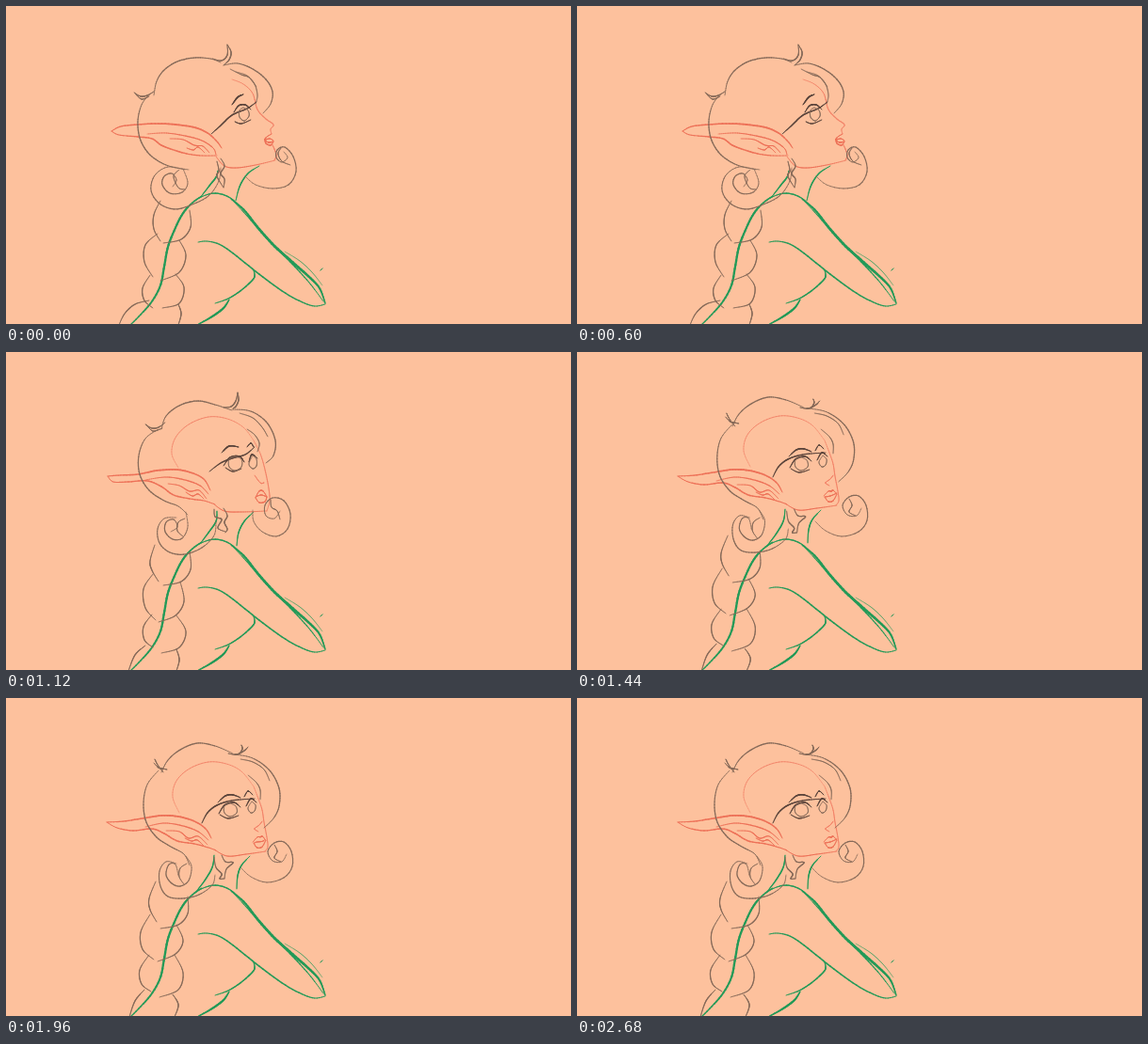
Animation, 600 px wide and 338 px high, one loop 2.72 s. Source, as an HTML page with a canvas:

```html
<!DOCTYPE html>
<html>
<head>
<meta charset="utf-8">
<style>
html, body { margin: 0; width: 100%; height: 100%; overflow: hidden; background: #fdc19d; }
canvas { display: block; }
</style>
</head>
<body>
<canvas id="stage" width="600" height="338"></canvas>
<script>
const ctx = document.getElementById('stage').getContext('2d');
const LOOP = 2720, STEP = 40, SAMPLES = 44;
const BROWN = '#866a59', DARK = '#5b453c', RED = '#ed7158', PINK = '#f28369', GREEN = '#239a58';
const strokes = [];

const mix = (a, b, k) => a + (b - a) * k;
const ease = k => k * k * (3 - 2 * k);

// Resample a smooth curve through "x,y x,y ..." so that poses can be blended.
function curve(text) {
  if (!text) return null;
  const p = text.split(' ').map(pair => pair.split(',').map(Number));
  const at = i => p[Math.max(0, Math.min(p.length - 1, i))];
  return Array.from({ length: SAMPLES + 1 }, (_, n) => {
    const u = n / SAMPLES * (p.length - 1), i = Math.min(Math.floor(u), p.length - 2), f = u - i;
    return [0, 1].map(c => {
      const a = at(i - 1)[c], b = at(i)[c], d = at(i + 1)[c], e = at(i + 2)[c];
      return b + f / 2 * (d - a + f * (2 * a - 5 * b + 4 * d - e + f * (3 * (b - d) + e - a)));
    });
  });
}

// Poses: profile, turning, three-quarter view, and an optional open mouth.
function add(color, width, sway, ...poses) {
  strokes.push({ color, width, sway, poses: poses.map(curve) });
}
const still = (width, pts) => add(GREEN, width, 0, pts, pts, pts);

// Body
still(2.3, '208,202 198,209 187,222 179,238 172,256 168,277 164,297 155,314 143,328 132,339');
still(.8, '203,206 192,214 184,226 177,242');
still(1.3, '202,206 212,201 222,199 232,201 241,206 250,215');
still(2.8, '239,205 253,217 268,236 285,255 305,273 322,288 333,300 339,316');
still(1.4, '241,207 256,223 275,245 300,270 322,294 337,314');
still(.6, '296,261 312,271 325,283 336,297');
still(1.6, '204,251 213,250 226,253 240,262 260,278 278,292 298,306 315,315 328,319 339,317');
still(1.5, '263,281 264,286 262,291 250,302 236,311 222,316');
still(2.1, '237,312 231,321 219,330 203,339');
still(.6, '334,281 336,279');
add(GREEN, 1.5, 0, '225,175 223,182 216,191 206,204', '224,169 223,180 215,192 206,204', '221,167 219,180 211,194 201,207');
add(GREEN, 1.4, 0, '269,170 258,177 251,186 247,195 244,207', '263,170 253,180 247,192 245,206', '259,168 250,178 246,189 245,203');

// Braid
add(BROWN, 1.2, .3, '164,207 157,222 157,237 164,250', '158,205 153,222 155,232 162,244', '159,195 152,213 153,225 160,238');
add(BROWN, 1.2, .3, '161,242 148,254 147,272 156,288', '156,236 146,252 148,272 159,285', '153,230 143,249 145,267 157,278');
add(BROWN, 1.2, .3, '153,286 145,300 147,313 156,321', '155,279 146,292 147,306 156,314', '152,273 142,289 144,304 154,312');
add(BROWN, 1.2, .3, '152,313 137,317 126,327 120,339', '148,312 137,322 130,339', '147,310 137,322 131,339');
add(BROWN, 1.2, .3, '195,217 196,235 186,248 167,252', '195,212 196,231 186,244 167,248', '193,211 193,229 183,241 164,245');
add(BROWN, 1.2, .3, '184,249 191,265 184,283 164,292', '185,244 189,265 180,280 162,287', '181,241 188,258 180,272 161,280');
add(BROWN, 1.2, .3, '180,285 189,299 184,316 166,321', '181,280 191,297 184,314 165,320', '179,273 188,292 183,310 163,318');
add(BROWN, 1.2, .3, '183,317 186,327 183,339', '181,316 184,327 181,339', '177,315 183,326 179,339');

// Skull, profile and jaw
add(PINK, .9, 0, null, '183,123 176,108 180,91 194,77 215,69 235,71 252,80 263,94', '184,122 177,105 181,88 195,75 215,68 234,70 250,78 263,94');
add(PINK, 1.1, 0, '240,78 252,83 262,93 267,110 276,120 284,126 281,131 282,136', '263,94 270,108 275,125 279,145 280,158 277,169', '263,94 268,107 272,119 274,132 277,148 278,158 275,163');
add(RED, 1, 0, '223,160 232,170 245,172 265,169 286,164', '220,161 232,169 250,170 277,169', '221,161 235,168 255,166 276,163');
add(PINK, 1, 0, '282,146 285,152 287,159 285,164', '264,131 270,139 274,139', '272,131 269,135 264,139 268,142');
add(RED, 1.1, 0, '282,136 277,139 275,142 280,141 284,143', '265,155 268,149 271,147 274,149 277,154', '262,153 267,148 270,148 272,147 276,151', '263,154 266,148 271,146 275,148 275,154');
add(RED, 1.1, 0, '275,142 276,146 281,148 284,144', '265,155 269,160 275,159 277,154', '263,154 267,159 272,158 276,151', '263,154 264,159 271,160 275,153');
add(RED, .9, 0, '275,143 279,145 284,144', '265,154 271,152 277,154', '263,154 269,153 276,150', '265,156 269,150 274,151 273,156 265,156');

// Ear
add(RED, 1.8, 0, '112,133 122,128 140,126 160,125 180,126 200,129 214,135 224,144 229,151', '108,132 120,131 140,130 160,126 180,125 196,128 210,135 217,147', '107,132 125,131 145,128 165,125 183,126 200,131 212,139 218,149');
add(RED, 1.5, 0, '112,133 120,137 140,139 155,141 165,148 178,153 192,157 207,159 224,159', '108,132 114,138 130,138 150,137 165,143 178,152 195,156 210,158 222,162', '107,132 118,138 135,141 155,139 168,144 182,152 200,155 215,159 223,162');
add(RED, 1.2, 0, '150,136 170,135 190,138 208,143 220,151 223,158', '148,136 170,133 190,136 206,142 215,151', '148,137 168,133 188,136 204,142 215,151');
add(RED, 1.1, 0, '174,141 188,142 200,148 209,149 216,156', '172,140 184,142 195,148 205,147 213,156', '170,141 184,142 194,149 204,147 214,156');
add(RED, 1, 0, '192,151 199,153 204,150 211,156', '191,149 198,153 204,151 210,156', '190,149 197,152 203,151 210,157');

// Hair on the head
add(BROWN, 1.3, 0, '157,95 160,80 168,68 182,59 200,55 217,56 228,60', '165,82 170,68 184,57 203,52 222,56 240,62', '165,79 172,66 185,55 203,48 222,51 241,59');
add(BROWN, 1.2, .2, '136,92 143,96 150,95 157,91', '148,77 155,81 162,80 169,75', '157,69 162,74 166,75 171,76');
add(BROWN, 1, .2, '137,93 144,99 152,96', '149,77 156,84 166,81', '158,65 161,71 167,79');
add(BROWN, 1.3, .2, '219,56 229,58 235,52 235,41', '231,59 239,58 244,52 246,43', '236,59 245,60 253,56 257,52');
add(BROWN, 1.3, .2, '235,41 239,49 237,57 231,63', '246,43 247,51 244,58 241,60', '250,50 251,54 248,59 243,60');
add(BROWN, 1.3, .9, '231,63 246,61 262,67 276,78 283,91 281,104 273,114', '240,61 260,63 277,75 286,94 284,110 276,118', '243,60 262,64 280,77 290,96 290,115 284,128 274,138');
add(BROWN, 1, .8, '238,67 250,73 258,76 266,86', '248,65 262,70 272,80 278,90', '249,65 262,68 274,76 280,88');
add(BROWN, .9, .5, '244,70 256,74 264,83 267,95 265,104', '256,82 264,88 269,97 267,106', '257,82 266,90 270,98 270,108');
add(DARK, 1.5, 0, '218,136 228,127 240,116 256,109 266,102', '216,127 228,118 240,113 254,109 264,101', '208,133 214,122 224,114 240,109 264,107');
add(BROWN, 1.3, .7, '152,94 144,105 140,122 142,140 150,155 162,165 176,171 194,174', '162,82 148,92 141,110 142,130 152,147 168,158 183,164 193,173', '162,77 150,92 146,112 149,132 160,148 175,158 189,166 195,178');

// Curls and side lock
add(BROWN, 1.2, .6, '190,174 172,171 158,180 154,196 163,210 180,216 200,210 216,201 226,186 228,172', '181,176 168,177 161,188 163,203 174,213 190,215 208,208 221,195 223,180', '181,176 170,174 163,184 164,200 172,211 188,213 205,209 219,199 222,188');
add(BROWN, 1.2, .6, '188,173 193,188 187,198 174,199 166,190 168,181 176,178 181,185 177,192', '191,170 193,186 187,198 177,199 169,191 170,181 178,178 182,186 175,191', '191,168 197,179 194,194 185,200 176,197 170,188 173,177 180,177 183,189');
add(BROWN, .9, .6, '184,174 178,181 183,193 190,195', '190,177 183,181 182,190 188,196', '192,176 185,181 184,190 189,198');
add(BROWN, 1.3, .4, '228,162 232,170 228,178 232,184 231,193', '221,167 222,175 229,178 225,187 233,191', '221,169 223,180 229,187 227,192 232,192');
add(BROWN, 1.3, .4, '224,165 226,175 224,181 231,193', '231,166 235,174 232,181 235,188 233,192', '229,167 233,174 241,175 234,182 232,192');
add(BROWN, 1.2, 1, '254,181 265,190 283,194 300,190 308,176 305,160 296,150 288,153 287,161 293,166 299,161 295,155', '262,168 263,180 272,191 287,196 299,188 302,172 295,158 283,155 275,163 276,174 285,177 291,169', '249,180 260,190 277,196 295,191 304,179 303,163 295,153 285,154 278,163 283,173 293,174 298,166');
add(BROWN, 1, 1, '292,151 289,157 293,165 302,169', '281,157 282,165 288,169 291,178', '285,156 288,163 285,170 292,174');

// Eyes and brows
add(DARK, 1.5, 0, '240,105 246,97 252,94', '229,107 237,100 247,101', '225,111 233,104 241,103 249,106');
add(DARK, 1, 0, null, '256,101 260,97 263,101', '253,105 257,99 262,103');
add(DARK, 1.4, 0, '242,113 247,106 254,105 260,110', '231,121 238,112 248,111 253,117', '226,123 232,114 242,111 249,116');
add(DARK, .9, 0, '243,123 250,125 260,121', '233,123 241,127 250,124', '227,124 236,128 247,125');
add(BROWN, 1, 0, '252,108 257,111 258,117 253,122 248,118 248,111 252,108', '243,111 250,114 250,122 243,126 237,122 237,114 243,111', '238,112 244,115 245,122 238,126 232,122 232,115 238,112');
add(DARK, 1.2, 0, null, '258,117 261,109 267,113', '255,115 260,107 266,111');
add(BROWN, .9, 0, null, '262,110 266,114 266,121 262,124 258,119 262,110', '261,110 265,114 264,120 260,122 257,117 261,110');

// Eased value from [time, value] keys.
function keyed(keys, t) {
  let i = 0;
  while (i < keys.length - 2 && t >= keys[i + 1][0]) i++;
  const [t0, v0] = keys[i], [t1, v1] = keys[i + 1];
  return mix(v0, v1, ease(Math.max(0, Math.min(1, (t - t0) / (t1 - t0)))));
}
const TURN = [[640, 0], [1120, 1], [1360, 2]];
const SWAY = [[0, 0], [300, 1.6], [600, 0], [840, -3], [1120, 0], [1440, 4], [1960, 0], [2240, -1.4], [2680, 0]];
const MOUTH = [[1680, 0], [1800, .7], [1960, .15], [2240, 1], [2440, .5], [2680, 0]];

function blend(from, to, k) {
  return from.map((p, i) => [mix(p[0], to[i][0], k), mix(p[1], to[i][1], k)]);
}

function drawStroke({ color, width, sway, poses }, turn, swing, open) {
  const [side, mid, front, talk] = poses;
  if (!side && turn <= 0) return;
  let pts = turn < 1 ? blend(side || mid, mid, turn) : blend(mid, front, turn - 1);
  if (talk && turn === 2) pts = blend(pts, talk, open);
  ctx.globalAlpha = side ? 1 : Math.min(1, turn * 1.5);
  ctx.strokeStyle = color;
  const dx = sway * swing;
  for (let i = 0; i < SAMPLES; i++) {
    ctx.lineWidth = width * (.5 + .5 * Math.sin(Math.PI * (i + .5) / SAMPLES));
    ctx.beginPath();
    ctx.moveTo(pts[i][0] + dx, pts[i][1]);
    ctx.lineTo(pts[i + 1][0] + dx, pts[i + 1][1]);
    ctx.stroke();
  }
}

function draw() {
  const t = Math.floor(performance.now() % LOOP / STEP) * STEP;
  const turn = keyed(TURN, t), swing = keyed(SWAY, t), open = keyed(MOUTH, t);
  ctx.globalAlpha = 1;
  ctx.fillStyle = '#fdc19d';
  ctx.fillRect(0, 0, 600, 338);
  ctx.lineCap = 'round';
  for (const s of strokes) drawStroke(s, turn, swing, open);
  requestAnimationFrame(draw);
}
draw();
</script>
</body>
</html>
```
